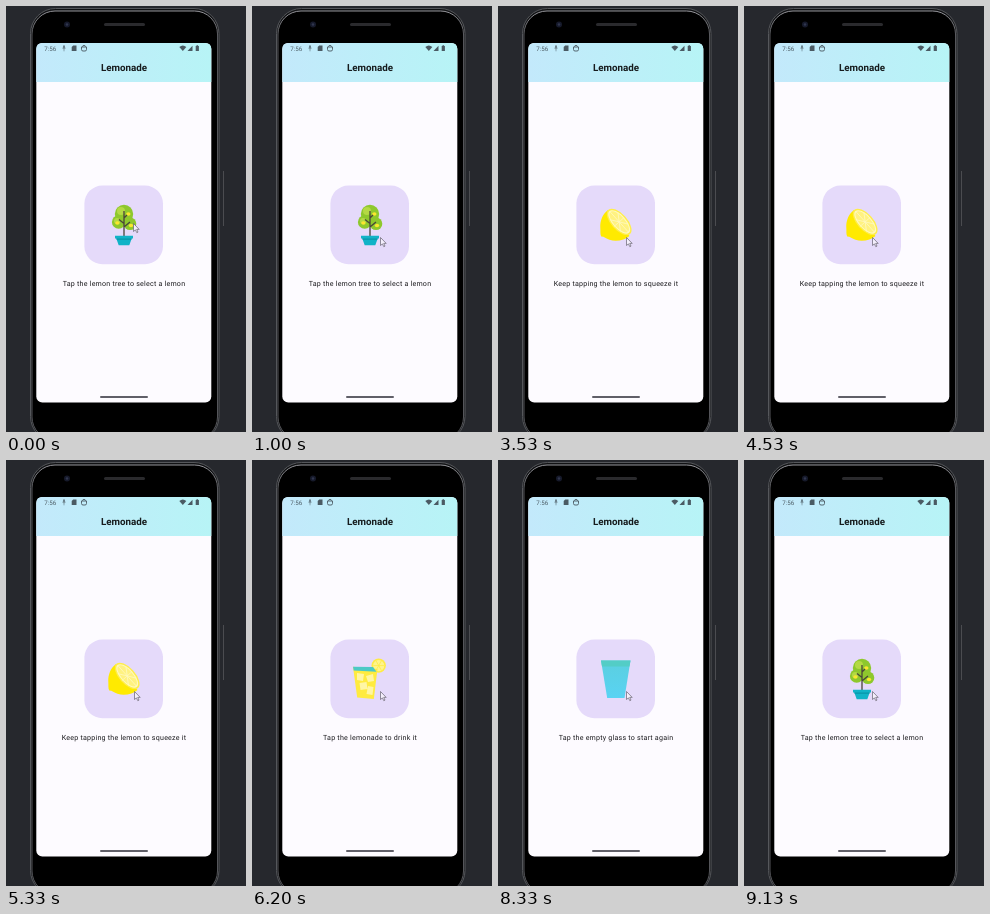
These frames come from a looping animation (240 px wide and 426 px high, 9.19 s). An HTML page:

```html
<!DOCTYPE html>
<html lang="en">
<head>
<meta charset="utf-8">
<title>Lemonade</title>
<style>
  html, body { margin: 0; width: 100%; height: 100%; overflow: hidden; background: #26282d; }
  svg { display: block; width: 100%; height: 100%; }
  text { font-family: Roboto, sans-serif; text-anchor: middle; text-rendering: geometricPrecision; }
</style>
</head>
<body>
<svg viewBox="0 0 240 426">
  <defs>
    <linearGradient id="bar">
      <stop offset="0" stop-color="#c3e9fb"/>
      <stop offset="1" stop-color="#b7f4f6"/>
    </linearGradient>
    <linearGradient id="rim" x2="0" y2="1">
      <stop offset="0" stop-color="#a5a5ab"/>
      <stop offset=".06" stop-color="#5d5e63"/>
    </linearGradient>
    <linearGradient id="water" x2="0" y2="1">
      <stop offset="0" stop-color="#5bcfdf"/>
      <stop offset="1" stop-color="#59d3f3"/>
    </linearGradient>
  </defs>
  <rect width="240" height="426" fill="#26282d"/>

  <!-- phone -->
  <path d="M217.5 165V220" stroke="#4b4c50"/>
  <rect x="24.5" y="2.5" width="188.5" height="433" rx="25" fill="#111214" stroke="#55575b"/>
  <rect x="26" y="5" width="185.5" height="429" rx="23" fill="#000" stroke="url(#rim)" stroke-width=".9"/>
  <circle cx="61" cy="18.5" r="3" fill="#161a2b"/>
  <circle cx="61" cy="18.5" r="1.2" fill="#30364e"/>
  <rect x="98" y="17" width="41" height="3" rx="1.5" fill="#2a2a2d"/>
  <rect x="30.3" y="37" width="175" height="359.5" rx="6" fill="#fdfbff"/>
  <path d="M30.3 76V43q0-6 6-6h163q6 0 6 6V76z" fill="url(#bar)"/>

  <!-- status bar -->
  <g fill="#4a5a63">
    <text x="44.2" y="44.6" font-size="6.2">7:56</text>
    <rect x="57.1" y="39.3" width="1.8" height="3.4" rx=".9" opacity=".8"/>
    <path d="M56.3 42q1.7 2.6 3.4 0M58 43.5V45.3" fill="none" stroke="#4a5a63" stroke-width=".5"/>
    <path d="M67.2 39.5H70.5V45H65.7V41z"/>
    <path d="M75.5 41h5v2.5q0 1.5-1.5 1.5h-2q-1.5 0-1.5-1.5zM76.2 40.8l.8-1.2h2l.8 1.2" fill="none" stroke="#4a5a63" stroke-width=".9"/>
    <path d="M173.3 41q3.5-3 7 0l-3.5 4z"/>
    <path d="M181.5 45l5-5.3V45z"/>
    <path d="M189.7 40h.8v-.8h1.6v.8h.8v5h-3.2z"/>
  </g>
  <text x="118" y="65" font-size="9.8" font-weight="700" fill="#171c1e">Lemonade</text>

  <rect x="78.4" y="179.6" width="78.6" height="78.6" rx="18" fill="#e5dafa"/>

  <g class="pic">
    <g fill="#8ec82d">
      <circle cx="118" cy="208" r="9.2"/>
      <circle cx="112.7" cy="216" r="6.8"/>
      <circle cx="124" cy="217.7" r="6.3"/>
    </g>
    <g fill="#b4d944">
      <circle cx="115" cy="205" r="4"/>
      <circle cx="111" cy="215" r="3"/>
    </g>
    <g fill="#fbe62e">
      <ellipse cx="122.3" cy="208" rx="2.2" ry="1.7"/>
      <ellipse cx="111.4" cy="217" rx="2.2" ry="1.7"/>
      <ellipse cx="125" cy="219.5" rx="2.2" ry="1.7"/>
    </g>
    <path d="M118 205V231M118 217.5l-5-4M118 221l6-5M118 212l3-3" fill="none" stroke="#4a4539" stroke-width="1.3"/>
    <path d="M109 229.7h18v2.8h-1.3l-2.4 6.8h-10.6l-2.4-6.8H109z" fill="#10b3c7"/>
    <path d="M110.3 232.5h15.4l-.4 1.2h-14.6z" fill="#0795a9"/>
  </g>

  <g class="pic">
    <path d="M110 204C104.5 208 102 215 102.3 221.5C102.6 225 102 228 103.2 230.6C106 230.5 108 232.5 111.5 233.8C118 236 127 234.3 131.5 230z" fill="#ffea00"/>
    <g transform="translate(121.2 215.9) rotate(48)">
      <ellipse rx="16.2" ry="8" fill="#ffee4a"/>
      <ellipse rx="14.6" ry="6.6" fill="#fff9bd"/>
      <ellipse rx="13.2" ry="5.6" fill="#fff281"/>
      <path d="M-14 0H14M-8-5.5L8 5.5M-8 5.5L8-5.5M0-6.5V6.5" stroke="#fff9bd" stroke-width=".8"/>
    </g>
  </g>

  <g class="pic">
    <circle cx="126.7" cy="205.6" r="7.2" fill="#ffeb45"/>
    <circle cx="126.7" cy="205.6" r="5.6" fill="#fff48c"/>
    <path d="M121.2 205.6h11M124 200.8l5.4 9.6M124 210.4l5.4-9.6" stroke="#ffeb45" stroke-width=".8"/>
    <path d="M101 206.7L125.5 209l-3.7 30-16.6-1.5z" fill="#ffeb3f"/>
    <path d="M101 206.7l20 .2 3.5 4.8-22.8-1.2z" fill="#4cc9c5"/>
    <path d="M105 213l7 1-1 7-6-1zM114 216l7-2 1 7-6 1zM107.5 223l7-1 1 7-7 1zM116 226l5.5 1-1 8-6-1z" fill="#fff6a4"/>
  </g>

  <g class="pic">
    <path d="M103 200.5h29.5l-6 37.5h-17.3z" fill="url(#water)"/>
    <path d="M103 200.5h29.5l-1 6h-27.5z" fill="#53cdc6"/>
  </g>

  <text id="hint" x="118" y="280.3" font-size="7.1" letter-spacing=".22" fill="#1c1b1f"></text>
  <rect x="94" y="390" width="48" height="2" rx="1" fill="#605f68"/>
  <path id="cursor" d="M0 0V8L1.9 6.4L3.3 9.2L4.5 8.6L3.2 5.9H5.7z" fill="#f4effc" stroke="#66626f" stroke-width=".7" stroke-linejoin="round"/>
</svg>
<script>
const LOOP = 9190;
const TREE = 0, LEMON = 1, DRINK = 2, EMPTY = 3;
const hints = [
  'Tap the lemon tree to select a lemon',
  'Keep tapping the lemon to squeeze it',
  'Tap the lemonade to drink it',
  'Tap the empty glass to start again'
];
const steps = [[0, TREE], [1870, LEMON], [5400, DRINK], [6870, EMPTY], [8530, TREE]];
const pics = document.querySelectorAll('.pic');
const hint = document.getElementById('hint');
const cursor = document.getElementById('cursor');
let shown = -1;

function show(state) {
  if (state === shown) return;
  shown = state;
  pics.forEach((pic, i) => pic.style.display = i === state ? '' : 'none');
  hint.textContent = hints[state];
}

function draw(t) {
  show(steps.filter(([start]) => start <= t).pop()[1]);
  const p = Math.min(1, Math.max(0, (t - 70) / 600));
  const ease = p * p * (3 - 2 * p);
  cursor.setAttribute('transform', `translate(${127.5 + ease} ${217.5 + 14 * ease})`);
}

function tick() {
  draw(performance.now() % LOOP);
  requestAnimationFrame(tick);
}
tick();
</script>
</body>
</html>
```
